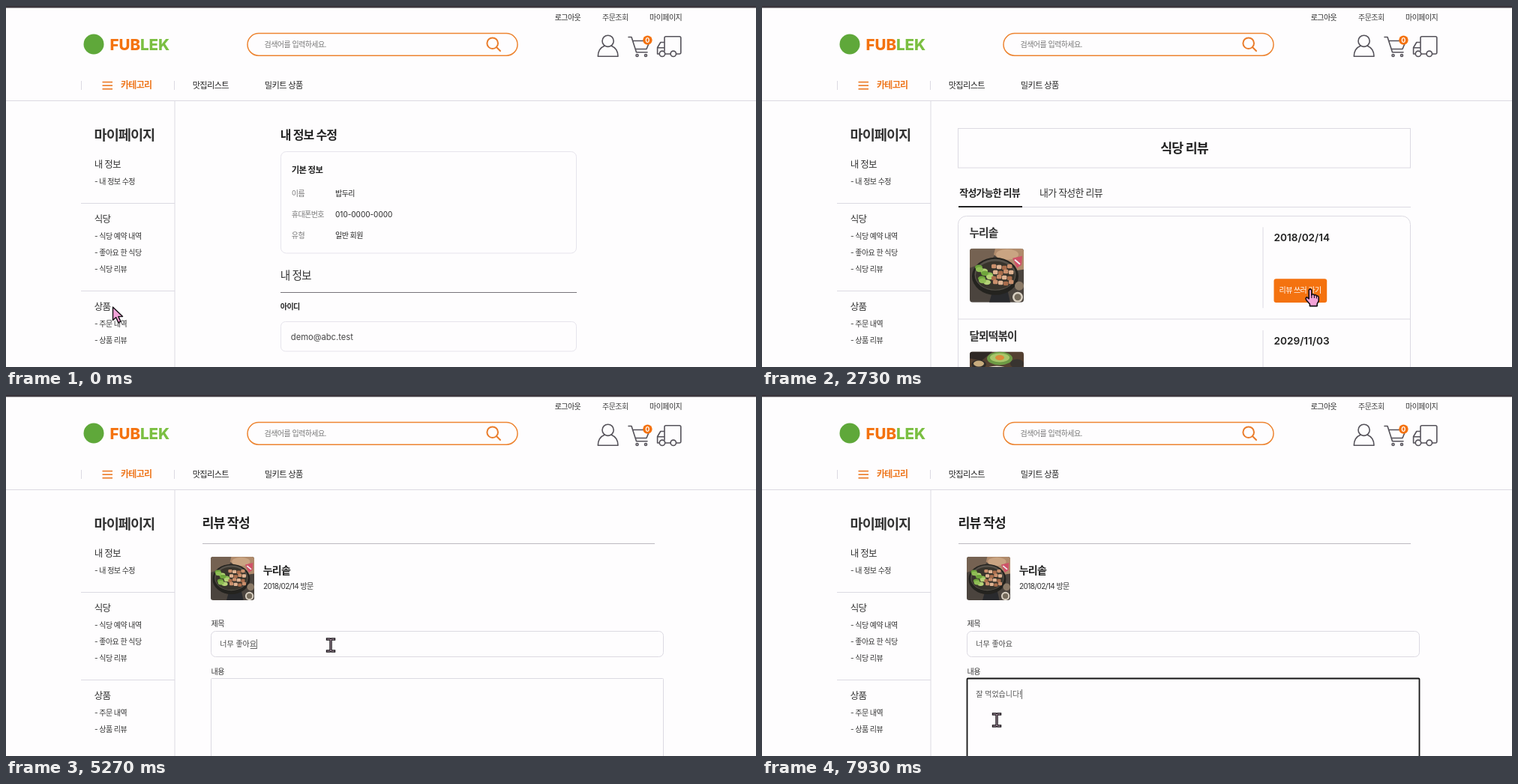
Write an HTML page that moves like this. It is 1000 px wide and 482 px high and loops after 8 s.

```html
<!DOCTYPE html>
<html lang="ko">
<head>
<meta charset="utf-8">
<style>
html, body { margin: 0; width: 100%; height: 100%; overflow: hidden; background: #fefdfe; }
svg { display: block; width: 1000px; height: 482px; }
text { font-family: Inter, "Noto Sans CJK KR", "Noto Sans KR", "Noto Sans CJK", sans-serif; white-space: pre; }
.ko { letter-spacing: -.056em; }
</style>
</head>
<body>
<svg id="stage" viewBox="0 0 1000 482"></svg>
<script>
const ORANGE = '#f4720f', EDGE = '#dcdae2', INK = '#333';

const text = (x, y, size, str, fill = INK, weight = 400, extra = '') =>
  `<text x="${x}" y="${y}" font-size="${size}" fill="${fill}" font-weight="${weight}" ` +
  `class="${/[ㄱ-힣]/.test(str) ? 'ko' : ''}" ${extra}>${str}</text>`;
const line = (x1, y1, x2, y2, stroke = EDGE, width = 1) =>
  `<path d="M${x1} ${y1}L${x2} ${y2}" stroke="${stroke}" stroke-width="${width}"/>`;
const box = (x, y, w, h, r, stroke = EDGE, width = 1, extra = '') =>
  `<rect x="${x}" y="${y}" width="${w}" height="${h}" rx="${r}" fill="none" stroke="${stroke}" stroke-width="${width}" ${extra}/>`;
const dot = (cx, cy, rx, fill, ry = rx) =>
  `<ellipse cx="${cx}" cy="${cy}" rx="${rx}" ry="${ry}" fill="${fill}"/>`;
const many = (n, fn) => Array.from({ length: n }, (_, i) => fn(i)).join('');

// Dish pictures, drawn on a 72 x 72 tile
const grill = `<g id="grill" clip-path="url(#tile)">
  <path d="M0 0H72V72H0Z" fill="#4b443e"/><path d="M0 0H40L28 16L0 26Z" fill="#756252"/>
  <path d="M34 0H72V28L58 30L32 8Z" fill="#b08b6c"/>${dot(50, 8, 15, '#c9a482', 7)}
  <path d="M57 13L70 10L69 22L63 26Z" fill="#cf5268"/><path d="M60 15L67 21" stroke="#eee" stroke-width="2"/>
  <path d="M30 58L50 54L54 72H26Z" fill="#292a2d"/>
  ${dot(34, 37, 31, '#24231f', 25)}${dot(34, 35, 27.5, '#57524a', 21)}${dot(34, 36, 26, '#38342c', 19)}
  ${many(9, i => dot(12 + i * 7 % 17, 25 + i * 5 % 22, 5, ['#6fa53c', '#b4d276', '#8fbd55'][i % 3], 3.4))}
  ${many(16, i => `<rect x="${29 + i % 4 * 7 + (i >> 2) % 2 * 2}" y="${21 + (i >> 2) * 7 + i % 3}" width="6.4" height="5.4" rx="1.5" fill="${['#c98f6c', '#e0b493', '#a96d4c'][i % 3]}"/>`)}
  ${dot(66, 50, 6, '#8b7a67')}${dot(64, 65, 7, '#d9d0c2')}${dot(64, 65, 4.5, '#756b5c')}</g>`;
const stew = `<g id="stew" clip-path="url(#tile)">
  <path d="M0 0H72V72H0Z" fill="#544031"/><path d="M0 0H30L16 12L0 9Z" fill="#2f2925"/>
  ${dot(40, 9, 17, '#6d9a45', 9)}${dot(40, 8, 13, '#a8c66b', 6)}${dot(40, 8, 6, '#db8b3c', 3.5)}
  ${dot(12, 17, 10, '#302c29', 6)}${dot(12, 16, 7, '#c8ac7e', 4)}${dot(63, 16, 9, '#383430', 6)}
  ${dot(36, 44, 31, '#e0d8cb', 25)}${dot(36, 44, 27, '#bd4422', 21)}</g>`;

const header = `
  <path d="M0 0H1000V2.6H0Z" fill="#3b363d"/>
  ${text(731.7, 18.5, 10, '로그아웃', '#222', 500)}${text(795, 18.5, 10, '주문조회', '#444')}${text(858, 18.5, 10, '마이페이지', '#333')}
  ${dot(117, 51, 13.5, '#5fa83a')}
  <text x="138.5" y="58.6" font-size="20.5" font-weight="800" fill="${ORANGE}">FUB<tspan fill="#7bbf42">LEK</tspan></text>
  ${box(322, 36.6, 360, 29.6, 14.8, '#ed8430', 1.5)}${text(344.6, 54.7, 10, '검색어를 입력하세요.', '#777')}
  <g fill="none" stroke="#ea7d2c" stroke-width="2" stroke-linecap="round">
    <circle cx="648.7" cy="49.7" r="7.3"/><path d="M654 55L659 60"/></g>
  <g fill="none" stroke="#55525a" stroke-width="1.6" stroke-linejoin="round" stroke-linecap="round">
    <circle cx="802.6" cy="46.8" r="7.6"/>
    <path d="M798 53.2C791 56 789.3 61 789.3 67.3H816C816 61 814 56 807.2 53.2"/>
    <path d="M830 41.5H834L840.5 61.8H855M836 46.5H858.5L854 57.5H839.4"/>
    <circle cx="841.5" cy="66" r="1.5"/><circle cx="853" cy="66" r="1.5"/>
    <path d="M871 64H868.6V55.5L872.8 48.5H878M868.6 55.8H878M878 60V42.5Q878 40.7 880 40.7H898Q899.8 40.7 899.8 42.5V62Q899.8 64 898 64H893.6M879 64H886"/>
    <circle cx="875" cy="63.8" r="3.7"/><circle cx="889.8" cy="63.8" r="3.7"/></g>
  ${dot(855.4, 45.6, 6.2, ORANGE)}${text(855.4, 48.9, 9, '0', '#fff', 700, 'text-anchor="middle"')}
  ${line(100.5, 100, 100.5, 112)}${line(224.5, 100, 224.5, 112)}
  ${[101.6, 106.2, 110.8].map(y => line(128.5, y, 142, y, '#ec7a26', 1.6)).join('')}
  ${text(153, 110.2, 12, '카테고리', '#ee761c', 700)}
  ${text(248.7, 110, 11.2, '맛집리스트', '#222')}${text(344.8, 110, 11.2, '밀키트 상품', '#222')}
  ${line(0, 126.5, 1000, 126.5)}${line(225, 127, 225, 482)}`;

const sidebar = text(117.6, 178.8, 18.67, '마이페이지', INK, 600) +
  [[215.5, '내 정보'], [289.3, '식당'], [406.3, '상품']].map(([y, s]) => text(117.8, y, 12.5, s, INK, 500)).join('') +
  [[237.5, '내 정보 수정'], [311.3, '식당 예약 내역'], [333.1, '좋아요 한 식당'], [355.1, '식당 리뷰'],
   [428.4, '주문 내역'], [450.4, '상품 리뷰']].map(([y, s]) => text(118, y, 10, '- ' + s)).join('') +
  line(100, 263.5, 225, 263.5) + line(100, 380.5, 225, 380.5);

const infoPage = text(365.7, 177.8, 16, '내 정보 수정', '#222', 600) +
  box(366.5, 194.5, 394, 135.5, 7, '#e6e4ec') + text(380.8, 222.8, 11.33, '기본 정보', '#222', 600) +
  [[253.5, '이름', '밥두리'], [281.5, '휴대폰번호', '010-0000-0000'], [309.7, '유형', '일반 회원']]
    .map(([y, k, v]) => text(380.8, y, 10, k, '#777') + text(439, y, 10, v, '#222')).join('') +
  text(365.7, 365, 14.67, '내 정보', INK, 500) + line(366, 382.5, 761, 382.5, '#77747a') +
  text(365.8, 405, 10, '아이디', '#222', 600) + box(366.5, 421.5, 394, 39.5, 6, '#e6e4ec') +
  text(379.8, 445.6, 11.2, 'demo@abc.test', '#444');

const entry = (y, name, date, pic) =>
  text(276.4, y + 28, 14.67, name, INK, 600) + line(668, y + 15, 668, y + 123) +
  text(682.6, y + 34, 13.6, date, '#222', 600) + `<use href="#${pic}" x="277" y="${y + 43.5}"/>`;
const listPage = box(261.5, 163.5, 603, 52.5, 0) +
  text(563, 195.5, 17.33, '식당 리뷰', '#222', 600, 'text-anchor="middle"') +
  text(263.3, 254.1, 12.9, '작성가능한 리뷰', '#222', 600) + text(370, 254.1, 12.9, '내가 작성한 리뷰') +
  line(262, 268.5, 865, 268.5) + line(262, 268, 347, 268, '#222', 1.8) +
  box(261.5, 280.5, 603, 260, 11) + line(262, 418, 865, 418) +
  entry(280.3, '누리솥', '2018/02/14', 'grill') + entry(418, '달뫼떡볶이', '2029/11/03', 'stew') +
  `<rect x="682.5" y="364.3" width="70.7" height="31.7" rx="3" fill="${ORANGE}"/>` +
  text(689.5, 383.2, 10, '리뷰 쓰러 가기', '#fff', 500);

const writePage = text(261.5, 177.3, 17.33, '리뷰 작성', '#222', 600) + line(262, 198.5, 865, 198.5, '#bcb9c0') +
  '<use href="#grill" transform="translate(273 216) scale(.806)"/>' +
  text(342.7, 239.2, 14, '누리솥', '#222', 600) + text(343, 258.9, 10, '2018/02/14 방문') +
  text(273.6, 309.2, 10, '제목') + box(273.5, 315.5, 603, 34, 6) +
  text(273.6, 372.7, 10, '내용') + box(273.5, 378.5, 603, 130, 1, EDGE, 1, 'id="area"') +
  text(285.2, 335.7, 10, '', '#444', 400, 'id="title"') + text(285.2, 402.6, 10, '', '#555', 400, 'id="body"') +
  '<path id="under" stroke="#444" stroke-width=".8"/><path id="caret" stroke="#666" stroke-width="1"/>';

const beam = 'M-4.5 -8H-1.2L0 -7L1.2 -8H4.5M0 -7V7M-4.5 8H-1.2L0 7L1.2 8H4.5';
const cursors = `
  <g id="arrow"><path d="M0 0V17.6L4.2 13.8L7.2 20.6L10.4 19.2L7.4 12.6H13Z" fill="#f3a3d8" stroke="#151015" stroke-width="1.4" stroke-linejoin="round"/></g>
  <g id="hand"><path d="M-1.8 1.2Q0 -1 1.8 1.2V8L3 6.8Q4.8 6.4 5.4 8.2Q7.6 7 8.4 9.2Q11 8.6 11.2 11V16L9.2 19.6V22.6H-.6V20L-5.4 14.4Q-6.8 11.4 -4.4 10.8L-1.8 13Z" fill="#f3a3d8" stroke="#151015" stroke-width="1.6" stroke-linejoin="round"/>
    <path d="M1.8 8V12M5.4 8.4V12M8.4 9.4V12.4" stroke="#151015" stroke-width="1.1"/></g>
  <g id="ibeam" fill="none" stroke-linecap="square"><path d="${beam}" stroke="#151015" stroke-width="3.4"/><path d="${beam}" stroke="#b9a3b3" stroke-width="1"/></g>`;

const stage = document.getElementById('stage');
stage.innerHTML = `<defs><clipPath id="tile"><rect width="72" height="72" rx="4"/></clipPath>${grill}${stew}</defs>
  ${header}${sidebar}<g id="info">${infoPage}</g><g id="list">${listPage}</g><g id="write">${writePage}</g>
  <g id="pointer">${cursors}</g>`;
const $ = id => document.getElementById(id);
const show = (id, on) => $(id).setAttribute('visibility', on ? 'inherit' : 'hidden');

const LOOP = 8000, LIST_AT = 1670, WRITE_AT = 3000, TITLE_AT = 3660, BODY_AT = 6000;
const path = [[70, 142.5, 402], [870, 158, 349], [1800, 158, 349], [2600, 731, 378],
  [3070, 731, 378], [3600, 433, 334], [5330, 433, 334], [5930, 313, 434]];

// Input-method stages: each entry is the text after one key
const grow = (prefix, stages) => stages.split(' ').map(s => prefix + s);
const typed = {
  title: { at: 4130, keys: [...grow('', 'ㄴ 너 넘 너무'), '너무 ', ...grow('너무 ', 'ㅈ 조 좋 좋ㅇ 좋아 좋앙 좋아요')] },
  body: { at: 6330, keys: [...grow('', 'ㅈ 자 잘'), '잘 ',
    ...grow('잘 ', 'ㅁ 머 먹 먹ㅇ 먹어 먹었 먹었ㅅ 먹었스 먹었습 먹었습ㄴ 먹었습니 먹었습닏 먹었습니다 먹었습니다!')] }
};
const KEY_MS = 90;

function pointerAt(t) {
  const i = path.findIndex(p => p[0] > t);
  if (i === 0) return path[0].slice(1);
  if (i < 0) return path[path.length - 1].slice(1);
  const [t0, x0, y0] = path[i - 1], [t1, x1, y1] = path[i];
  const u = (t - t0) / (t1 - t0), e = u * u * (3 - 2 * u);
  return [x0 + (x1 - x0) * e, y0 + (y1 - y0) * e];
}

function pointerShape(page, x, y) {
  if (page === 'write') return y > 377 || (y > 315 && y < 350) ? 'ibeam' : 'arrow';
  const onLink = x < 164 && y > 345 && y < 358;
  const onButton = page === 'list' && x > 682 && y > 364;
  return onLink || onButton ? 'hand' : 'arrow';
}

function drawField(id, t, focusAt, focused) {
  const { at, keys } = typed[id], el = $(id);
  const n = Math.min(keys.length, Math.floor((t - at) / KEY_MS) + 1);
  const str = n > 0 ? keys[n - 1] : '';
  if (el.textContent !== str) el.textContent = str;
  if (!focused) return;
  const width = str ? el.getComputedTextLength() : 0;
  const x = 285.5 + width, y = id === 'title' ? 332.5 : 399.5;
  const since = t - (n > 0 ? at + (n - 1) * KEY_MS : focusAt);
  $('caret').setAttribute('d', `M${x} ${y - 6.5}V${y + 6.5}`);
  show('caret', since >= 0 && since % 1060 < 530);
  const composing = /[ㄱ-힣]$/.test(str);
  show('under', composing);
  if (composing) $('under').setAttribute('d', `M${x - 8.6} ${y + 6}H${x}`);
}

function draw(t) {
  const page = t < LIST_AT ? 'info' : t < WRITE_AT ? 'list' : 'write';
  for (const id of ['info', 'list', 'write']) show(id, id === page);

  const inBody = t >= BODY_AT;
  $('area').setAttribute('stroke', inBody ? '#151515' : EDGE);
  $('area').setAttribute('stroke-width', inBody ? 1.8 : 1);
  if (page === 'write') {
    drawField('title', t, TITLE_AT, !inBody);
    drawField('body', t, BODY_AT, inBody);
  } else {
    show('caret', false);
    show('under', false);
  }

  const [x, y] = pointerAt(t), shape = pointerShape(page, x, y);
  $('pointer').setAttribute('transform', `translate(${x.toFixed(1)} ${y.toFixed(1)})`);
  for (const id of ['arrow', 'hand', 'ibeam']) show(id, id === shape);
}

const start = performance.now();
function tick() {
  const t = (performance.now() - start) % LOOP;
  draw(Math.floor(t * .015 + .01) / .015);
  requestAnimationFrame(tick);
}
tick();
</script>
</body>
</html>
```
